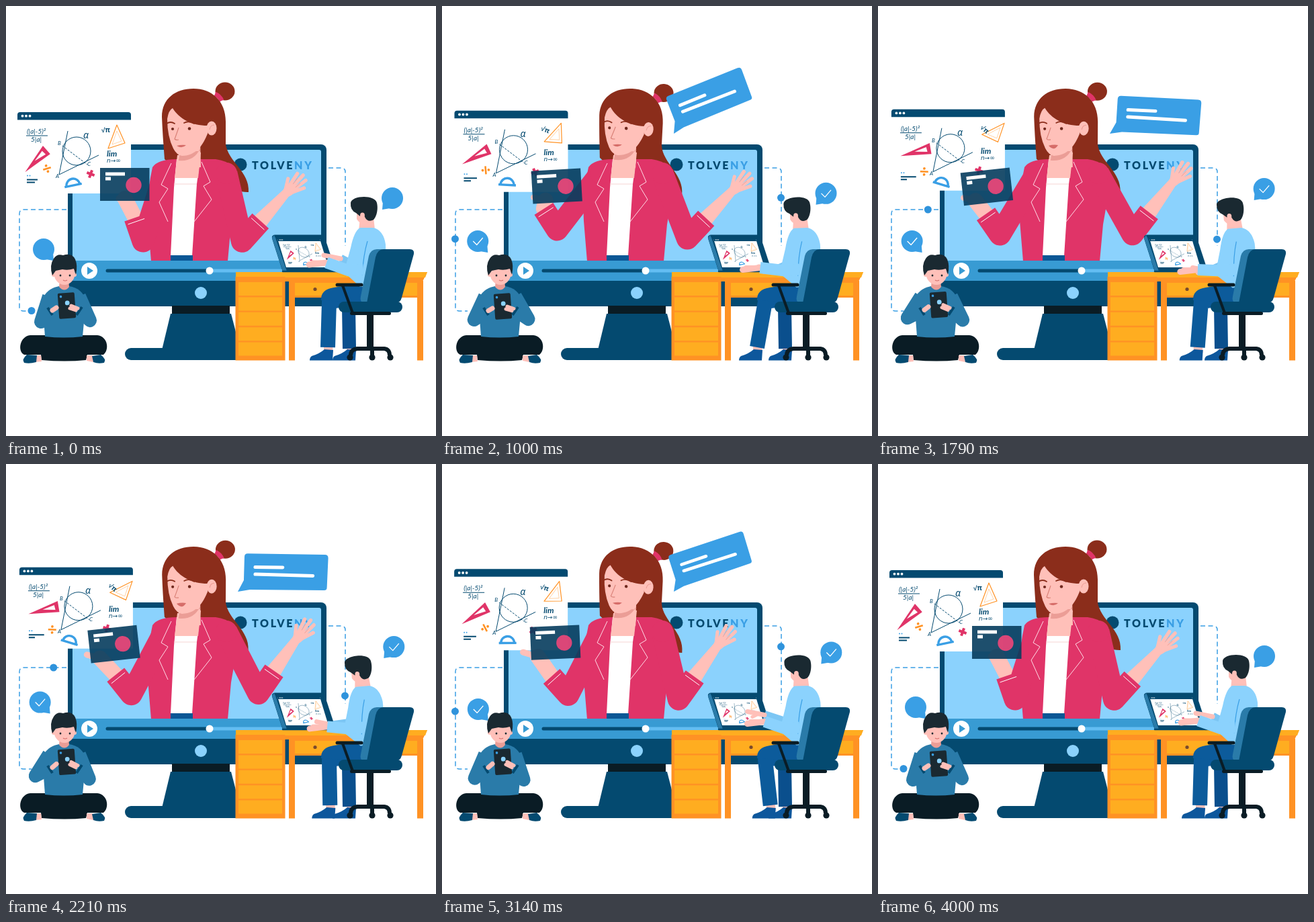
An HTML page with a canvas that plays this animation: 640 px wide and 640 px high, repeating every 4.07 s.

```html
<!DOCTYPE html>
<html lang="en">
<head>
<meta charset="utf-8">
<title>Online lesson</title>
<style>
html, body { margin: 0; width: 100%; height: 100%; overflow: hidden; background: #fff; }
canvas { display: block; width: 100vw; height: 100vh; }
</style>
</head>
<body>
<canvas id="stage" width="640" height="640"></canvas>
<script>
const c = document.getElementById('stage').getContext('2d');
const NAVY = '#044a70', SKY = '#8bd2fd', BLUE = '#3a9fe5', STEEL = '#2a7ba9', INK = '#0a1c25',
  HAIR = '#1a2931', BROWN = '#8b2d1b', SKIN = '#ffc0b9', SHADE = '#eb9d96', RED = '#e03468',
  ORANGE = '#ff9224', AMBER = '#ffad20', JEANS = '#0c5b9b', WHITE = '#fff';
const LOOP = 4070, SPAN = 4000, STEP = LOOP / 57, TURN = 1985;
const DEG = Math.PI / 180;

// half: ms run forth and back; mid, lag, twice: the swings all poses share
let half = 0, mid = 0, lag = 0, twice = 0;
const wave = (base, a = 0, b = 0, d = 0) => base + a * mid + b * lag + d * twice;
const polar = ([x, y], deg, r) => [x + r * Math.sin(deg * DEG), y - r * Math.cos(deg * DEG)];

function fill(d, color) { c.fillStyle = color; c.fill(new Path2D(d)); }
function line(d, color, w = 1, cap = 'butt') {
  c.strokeStyle = color; c.lineWidth = w; c.lineCap = cap; c.lineJoin = 'round';
  c.stroke(new Path2D(d));
}
function poly(points, color, w, cap) { line('M' + points.map(p => p.join()).join('L'), color, w, cap); }
function rect(x, y, w, h, color, r = 0) {
  c.fillStyle = color; c.beginPath(); c.roundRect(x, y, w, h, r); c.fill();
}
function disc(x, y, r, color, ry = r) {
  c.fillStyle = color; c.beginPath(); c.ellipse(x, y, r, ry, 0, 0, 7); c.fill();
}
function text(s, x, y, font, color = NAVY) { c.font = font; c.fillStyle = color; c.fillText(s, x, y); }
function dashed(dash, draw) { c.setLineDash(dash); draw(); c.setLineDash([]); }
function group(x, y, deg, draw, s = 1) {
  c.save(); c.translate(x, y); c.rotate(deg * DEG); c.scale(s, s); draw(); c.restore();
}
function pivot(x, y, deg, draw) { group(x, y, deg, () => { c.translate(-x, -y); draw(); }); }

// Point at distance d along a route of corners
function along(route, d) {
  for (let i = 1; i < route.length; i++) {
    const [a, b] = [route[i - 1], route[i]], len = Math.hypot(b[0] - a[0], b[1] - a[1]);
    if (d <= len || i === route.length - 1) return a.map((v, j) => v + (b[j] - v) * d / len);
    d -= len;
  }
}

function wires() {
  dashed([7, 4.5], () => {
    line('M90,303H26Q20,303 20,309V448Q20,454 26,454H38', BLUE, 1.5);
    line('M480,241H499Q505,241 505,247V357', BLUE, 1.5);
  });
  disc(...along([[38, 453.5], [19.5, 453.5], [19.5, 303], [92, 303]], half * .1254), 5.5, '#2f93dc');
  disc(...along([[470, 241], [504.5, 241], [504.5, 370]], half * .0788), 5.5, '#2f93dc');
}

function monitor() {
  rect(92, 206, 385, 241, NAVY, 8);
  rect(99, 214, 370, 165, SKY, 3);
  rect(99, 379, 370, 30, '#389bd3');
  disc(290, 427, 9, SKY);
  rect(247, 446, 86, 13, INK);
  fill('M245,458H335L349,512H232Z', NAVY);
  rect(177, 509, 180, 18, NAVY, 9);
  line('M303,394H450', '#63bdf2', 5, 'round');
  line('M151,394H303', NAVY, 5, 'round');
  disc(303, 394, 5.5, WHITE);
  disc(124, 394, 12, WHITE);
  fill('M121,388L130,394L121,400Z', '#389bd3');
  disc(349, 236, 9.5, NAVY);
  c.letterSpacing = '2.6px';
  const font = '900 16px Lato, sans-serif';
  text('TOLVE', 366, 243, font);
  text('NY', 366 + c.measureText('TOLVE').width, 243, font, BLUE);
  c.letterSpacing = '0px';
}

function sheet(k) {
  const mix = (a, b) => a + (b - a) * k;
  rect(0, 4, 169, 117, WHITE);
  rect(0, 0, 169, 11.5, NAVY, [4, 4, 0, 0]);
  for (const x of [7.5, 13, 18.5]) disc(x, 5.7, 1.9, WHITE);
  const hand = 'italic 10px Lato, sans-serif', small = 'italic 8px Lato, sans-serif';
  text('(|a|-5)²', 14, 32, hand);
  line('M13,35H45', NAVY, 1);
  text('5|a|', 20, 44, hand);
  text('lim', 133, 66, 'italic bold 12px Lato, sans-serif');
  text('n→∞', 133, 75, 'italic 9px "DejaVu Sans", sans-serif');
  text('α', 98, 39, 'italic 14px "Noto Sans", sans-serif');
  text('B', 60, 49, small);
  text('A', 57, 98, small);
  text('C', 104, 80, small);
  line('M67,58a21,21 0 1 0 42,0a21,21 0 1 0 -42,0M75,28L62,93L121,64', NAVY, 1);
  dashed([3, 2], () => line('M67,50L104,78', NAVY, 1));
  group(mix(33, 44), mix(67, 62), mix(-31, 2), () => {
    fill('M-30,8L13,-12L16,4Z', RED);
    fill('M-9,1L8,-6L10,1Z', WHITE);
  });
  group(mix(44, 49), mix(84, 93), mix(-18, 188), () => {
    line('M-6,0H6', ORANGE, 2.6);
    disc(0, -4.5, 1.9, ORANGE); disc(0, 4.5, 1.9, ORANGE);
  });
  group(mix(83, 74), mix(109, 112), mix(-12, 18), () =>
    line('M-13,0H13M-10,0A10,10 0 0 1 10,0', BLUE, 3.4));
  group(mix(109, 131), mix(92, 91), mix(20, 110), () => line('M-6,0H6M0,-6V6', RED, 4));
  group(mix(148, 154), mix(40, 36), mix(0, 44), () => {
    line('M0,-21L-13,14L12,6Z', ORANGE, 1.2);
    line('M0,-12L-7,8L7,3Z', '#ffc58b', .7);
  });
  group(mix(132, 140), mix(26, 30), mix(0, 42), () => text('√π', -7, 4, 'bold 10px "Noto Sans", sans-serif'));
  line(`M14,100.5H${mix(30, 37)}M14,104.5H${mix(26, 23)}`, NAVY, 2);
  disc(15, 94.5, 1, BLUE); disc(18.5, 94.5, 1, BLUE);
}

function sleeve(shoulder, elbow, cuff, lean) {
  poly([shoulder, elbow, cuff], RED, 33);
  disc(...shoulder, 16, RED);
  const seam = polar(cuff, lean, -6);
  poly([polar(seam, lean + 90, 13), polar(seam, lean - 90, 13)], WHITE, 1);
}

function backHair() {
  disc(326, 127, 14.5, BROWN, 13.5);
  line('M311,131Q318,134 321,141', RED, 7);
  fill('M236,228Q233,190 232,165C232,138 252,123 279,123C306,123 327,141 327,172V205C330,232 363,246 361,277C338,278 325,262 318,245L290,240H250Z', BROWN);
}

function head() {
  fill('M258,205L289,200L290,240H256Z', SKIN);
  fill('M259,216H289V212Q280,232 257,230Z', SHADE);
  fill('M240,168Q242,155 248,152C258,168 276,178 300,178V190C294,205 284,223 262,223Q254,222 249,212Q240,194 240,168Z', SKIN);
  disc(306, 182, 7.5, SKIN, 10.5);
  line('M303,184Q304,177 310,177', SHADE, 1);
  disc(248, 183, 2.1, '#70291f'); disc(273, 182.5, 2.3, '#70291f');
  line('M239,175Q245,171 251,175M265,174Q272,170 280,175', BROWN, 1.8, 'round');
  line('M257,181Q253,193 251,198Q253,200 257,199', '#d98279', 1.2);
  fill(`M254,208Q261,206 268,207Q262,${213 + 5 * mid ** 8} 254,208Z`, '#d66d69');
}

function woman() {
  const turn = draw => pivot(280, 205, wave(0, 0, 0, 3), draw);
  turn(backHair);
  const leftFore = -wave(19, 17, -6, 11), rightFore = wave(42, -6, 4);
  const left = [236, 249], right = [328, 249];
  const leftElbow = polar(left, 180 + wave(17.6, 11, 4.5, 10), 106);
  const rightElbow = polar(right, 180 - wave(13, 16, 3, -3), 104);
  const leftCuff = polar(leftElbow, leftFore, 37), rightCuff = polar(rightElbow, rightFore, 41);
  const card = [wave(177, -16, 2), wave(265.5, 3, 1)];
  const slide = wave(0, -18, 6, -14);
  const palm = [card[0] + slide, card[1] + 21];
  poly([leftCuff, palm], SKIN, 23, 'round');
  poly([palm, [palm[0] - 9 + slide / 2, palm[1] + slide / 4]], SKIN, 9, 'round');
  group(...rightCuff, rightFore + 1, () => {
    fill('M-12,8L-7,-56Q-8,-66 -6,-72H8Q9,-62 6,-55L12,8Z', SKIN);
    line('M-4,-66L-8,-89M0,-68L0,-93M4,-67L8,-90M5,-62L14,-80', SKIN, 5.2, 'round');
    line('M-5,-60L-13,-74', SKIN, 5, 'round');
    line('M-2,-73L-3,-84M4,-72L5,-82', SHADE, .8);
  });
  c.save();
  c.beginPath(); c.rect(0, 0, 640, 379); c.clip();
  fill('M254,228Q226,228 218,240Q209,280 211,320L216,380H330L335,325L346,262Q344,232 312,228Z', RED);
  sleeve(left, leftElbow, leftCuff, leftFore);
  sleeve(right, rightElbow, rightCuff, rightFore);
  fill('M254,228L289,228L284,265L277,372H245L250,270Z', WHITE);
  fill('M255,222L290,218L286,256H251Z', SKIN);
  line('M250,265H284', '#f5d5d3', 1);
  rect(245, 371, 33, 9, '#0b5795');
  line('M246,234L231,266L241,272L228,292L241,321M291,232L304,262L294,268L306,288L280,321', '#ffdbe6', 1);
  c.restore();
  turn(head);
  group(...card, wave(0, -6.5), () => {
    c.globalAlpha = .9;
    rect(-37, -24.5, 73.5, 49, '#063c5e');
    disc(13, 1, 11.7, '#f04679');
    c.globalAlpha = 1;
    rect(-29, -18, 29, 5, WHITE);
    rect(-29, -11, 8, 5, WHITE);
  });
}

function bubble(x, y, side) {
  disc(x, y, 16, BLUE);
  fill(`M${x + side * 14},${y + 5}L${x + side * 15},${y + 17}L${x + side * 3},${y + 15}Z`, BLUE);
  const shown = 24 * Math.min(1, half / 800);
  if (shown) dashed([shown, 24], () =>
    line(`M${x - 7},${y}L${x - 1.5},${y + 5.5}L${x + 7.5},${y - 5}`, WHITE, 1.3));
}

function message() {
  const size = 1 - Math.exp(-half / 300);
  const swing = -24 * Math.sin(Math.PI * (half / 1757) ** 1.6);
  if (size) group(345, 190, swing, () => {
    fill('M15,-57L130,-55Q135,-55 135,-50L133,-6Q133,-2 129,-2L18,-3L0,0L9,-17L10,-52Q10,-57 15,-57Z', BLUE);
    line('M26,-36.5L67,-36M26,-26L112,-23.5', WHITE, 5, 'round');
  }, size);
}

function boy() {
  fill('M36,490C20,492 17,514 27,519L52,519L53,527Q88,530 119,527L121,519L145,519C154,512 152,492 136,490Z', INK);
  fill('M44,520H52L53,529L43,530ZM120,520H129L130,530L120,528Z', SKIN);
  fill('M31,519L46,520L45,530Q35,533 27,531Q23,526 31,519Z', NAVY);
  fill('M141,519L128,521L130,530Q137,533 146,531Q150,526 141,519Z', NAVY);
  fill('M79,417Q59,421 54,438L58,492Q86,495 114,492L119,438Q113,420 94,417Z', STEEL);
  fill('M80,408H93L94,418Q87,427 79,418Z', SHADE);
  disc(87, 398, 15.5, SKIN, 17);
  disc(71, 400, 3, SKIN); disc(102, 400, 3, SKIN);
  fill('M69,401Q64,386 71,376Q76,368 85,371Q98,367 103,377Q107,386 104,400L101,391Q92,394 84,392L74,394Z', HAIR);
  const eye = Math.min(1, .15 + Math.abs(half - 1415) / 150);
  for (const x of [81, 95]) disc(x, 401, 1.4, HAIR, 1.5 * eye);
  line('M85,408Q88,410 91,408', '#d66d69', 1.2);
  const lift = wave(0, -2, 2), y = 454 + lift / 2;
  poly([[64, 432], [wave(52, -8.5), wave(470, -6)], [66, y]], STEEL, 20);
  poly([[109, 432], [wave(125, 0, 3.5), wave(468, 0, -2)], [110, y - 1]], STEEL, 20);
  line('M62,449L69,460M113,448L105,460', NAVY, 4);
  group(90.5, 446 + lift, -4, () => {
    rect(-12.5, -19, 25, 38, HAIR, 2);
    disc(-8, -14, 1.8, BLUE);
    disc(1, -4, 3.4, SKY);
  });
  line(`M107,${y - 4}L97,${446 + lift}M104,${y - 1}L95,${450 + lift}`, SKIN, 5, 'round');
  line(`M69,${y - 1}L75,${449 + lift}`, SKIN, 7, 'round');
}

function desk() {
  fill('M342,396H627L620,410H342Z', ORANGE);
  fill('M342,396H627L624,404H342Z', AMBER);
  rect(421, 409, 200, 25, ORANGE);
  rect(430, 412, 182, 19, AMBER);
  disc(460, 421.5, 2.6, '#7a4a2c');
  rect(421, 409, 9, 118.5, ORANGE);
  rect(612, 409, 9, 118.5, ORANGE);
  rect(341.5, 403, 74, 124.5, ORANGE);
  for (let i = 0; i < 5; i++) rect(346, 411 + i * 22.4, 65, 20, AMBER);
}

function laptop() {
  fill('M400,340.5H470Q473,340.5 474,343L490,392Q490,396 486,396H412L396,346Q395,341 400,340.5Z', NAVY);
  fill('M399,341L396,345L412,395H418L401,345Z', STEEL);
  c.save();
  c.transform(.372, 0, .108, .355, 404, 346);
  sheet(0);
  c.restore();
  line('M412,395H496', NAVY, 2.5, 'round');
}

function shoe(x) {
  group(x, 0, 0, () => {
    fill('M21,506h13l1,10h-14Z', SKIN);
    fill('M0,527.5H34L35,512L22,511Q14,518 3,521Q0,523 0,527.5Z', '#0d579c');
  });
}

function man() {
  const foot = wave(452, 0, -10);
  shoe(486); shoe(foot);
  line('M545,435L510,448L511,510', '#0a4f8d', 20);
  poly([[540, 432], [481, 440], [foot + 27, 508]], JEANS, 22);
  fill('M469,438Q468,422 488,419L525,413L560,440H500Z', JEANS);
  const far = [wave(473, -7, 9, -7), wave(371, 16, 9)];
  const near = [wave(451, 0, -3.5), wave(385, 10, 2.5)];
  const farWrist = [far[0] + 25, far[1] + 5], wrist = [near[0] + 26, near[1] - 3];
  poly([[515, 385], farWrist], '#7cc6f4', 13);
  poly([farWrist, far], SKIN, 7, 'round');
  line(`M${far[0] + 15},${far[1] + 4}l-8,4`, SKIN, 5, 'round');
  pivot(545, 410, wave(0, -4.6), () => {
    fill('M527,314H547L549,333L525,335Z', SKIN);
    fill('M522,305H537V322Q527,326 522,317Z', SKIN);
    fill('M513,293C514,282 549,280 552,293C555,306 549,319 545,319Q538,322 534,314Q530,305 527,313L521,308Q512,304 513,293Z', HAIR);
    disc(530.5, 311.5, 3.4, SKIN, 4);
    fill('M527,330Q518,335 513,360L503,396L527,418H566L565,355Q562,334 547,330Z', SKY);
    line('M538,350Q532,370 530,401', BLUE, 1.2);
  });
  poly([wrist, near], SKIN, 9, 'round');
  poly([[wrist[0] - 8, wrist[1]], [near[0] + 5, near[1] - 3]], SKIN, 7, 'round');
  poly([[532, 392], [511, 394], wrist], SKY, 17);
}

function chair() {
  fill('M552,362H572L560,442H533Q526,441 528,432L540,372Q543,362 552,362Z', STEEL);
  fill('M562,362H601Q608,362 607,369L589,434Q587,442 579,442H537L550,374Q553,362 562,362Z', NAVY);
  rect(495, 440, 95, 16, NAVY, 8);
  rect(512, 455, 61, 5, INK, 2.5);
  line('M493,415H529', INK, 5, 'round');
  line('M501,416L516,457', INK, 4);
  rect(537, 459, 10, 52, INK);
  line('M513,520Q513,511 523,510H563Q571,511 571,520M545,508V520', INK, 6);
  for (const x of [512, 545, 572]) disc(x, 523, 4.6, INK);
}

function draw() {
  rect(0, 0, 640, 640, WHITE);
  wires();
  monitor();
  group(wave(17, 3), wave(158, -4.4), 0, () => sheet(mid));
  woman();
  message();
  bubble(wave(56, -5.5), wave(362, -10, -7), 1);
  boy();
  desk();
  laptop();
  bubble(wave(575, 1, -4), wave(286, -14.3), -1);
  man();
  chair();
}

function frame(ms) {
  const now = Math.floor((ms % LOOP + 4) / STEP) % 57 * STEP;
  const angle = now / SPAN * 2 * Math.PI;
  half = Math.max(0, TURN - Math.abs(now - TURN));
  mid = (1 - Math.cos(angle)) / 2;
  lag = Math.sin(angle);
  twice = lag * lag;
  draw();
}

let start;
function loop(ms) {
  start ??= ms;
  frame(ms - start);
  requestAnimationFrame(loop);
}
frame(0);
requestAnimationFrame(loop);
</script>
</body>
</html>
```
